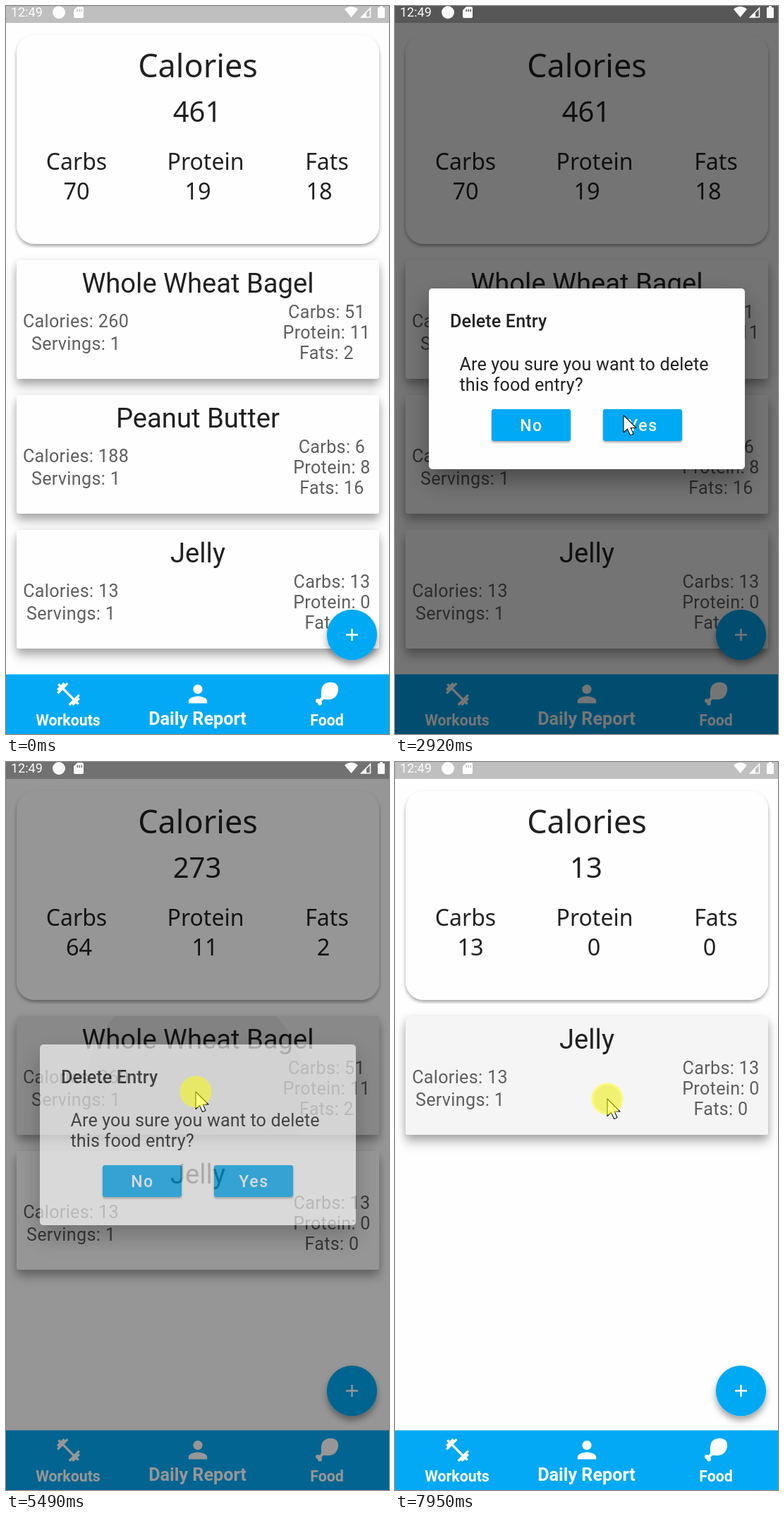
Recreate the animation shown at these times as an HTML page. Size 543 px wide and 1031 px high, loop 8 s.

```html
<!DOCTYPE html>
<html lang="en">
<head>
<meta charset="utf-8">
<title>Daily Report</title>
<style>
  html, body { margin: 0; width: 100%; height: 100%; overflow: hidden; background: #fefefe; }
  svg { display: block; width: 543px; height: 1031px; }
  text { font-family: Roboto, sans-serif; white-space: pre; }
  .mid { text-anchor: middle; }
  .head text { font-family: "Noto Sans", sans-serif; fill: #212121; text-anchor: middle; }
  .title { font-size: 38.2px; fill: #212121; text-anchor: middle; }
  .info { font-size: 25.1px; letter-spacing: .33px; fill: #5f5f5f; text-anchor: middle; }
  .ask { font-size: 25.1px; letter-spacing: .15px; fill: #212121; }
  .btn { font-size: 23px; font-weight: 500; letter-spacing: 1.65px; fill: #fff; text-anchor: middle; }
  .nav text { font-weight: 700; fill: #fff; text-anchor: middle; }
</style>
</head>
<body>
<svg viewBox="0 0 543 1031" xmlns="http://www.w3.org/2000/svg">
  <defs>
    <filter id="lift" x="-10%" y="-20%" width="120%" height="150%">
      <feDropShadow dx="0" dy="3" stdDeviation="6" flood-opacity=".14"/>
      <feDropShadow dx="0" dy="10" stdDeviation="7" flood-opacity=".26"/>
    </filter>
    <filter id="low" x="-10%" y="-10%" width="120%" height="120%">
      <feDropShadow dx="0" dy="3" stdDeviation="2.5" flood-opacity=".36"/>
    </filter>
    <filter id="fabShade" x="-30%" y="-30%" width="160%" height="170%">
      <feDropShadow dx="0" dy="6" stdDeviation="5" flood-opacity=".36"/>
    </filter>
    <filter id="far" x="-20%" y="-20%" width="140%" height="150%">
      <feDropShadow dx="0" dy="16" stdDeviation="16" flood-opacity=".36"/>
    </filter>
    <filter id="btnShade" x="-15%" y="-30%" width="130%" height="180%">
      <feDropShadow dx="0" dy="2" stdDeviation="1.6" flood-opacity=".35"/>
    </filter>
    <filter id="btnUp" x="-20%" y="-40%" width="140%" height="220%">
      <feDropShadow dx="0" dy="6" stdDeviation="5" flood-opacity=".4"/>
    </filter>
    <clipPath id="cardClip"><rect x="15" y="360" width="514" height="168" rx="4"/></clipPath>
    <clipPath id="yesClip"><rect x="295" y="571" width="112" height="45" rx="3"/></clipPath>
  </defs>

  <rect width="543" height="1031" fill="#fefefe"/>
  <g class="head">
    <rect x="15" y="41" width="514" height="296" rx="26" fill="#fefefe" filter="url(#low)"/>
    <rect y="342.5" width="543" height="604" fill="#fefefe"/>
    <text x="272" y="101" font-size="45">Calories</text>
    <text id="cal" x="271" y="164" font-size="40"></text>
    <text x="100" y="232" font-size="32">Carbs</text>
    <text x="283" y="232" font-size="32">Protein</text>
    <text x="455" y="232" font-size="32">Fats</text>
    <g font-size="32.5">
      <text id="carbs" y="273.5"></text>
      <text id="protein" y="273.5"></text>
      <text id="fats" y="273.5"></text>
    </g>
  </g>

  <g id="cards"></g>

  <circle cx="490.5" cy="890.5" r="35.7" fill="#03a9f4" filter="url(#fabShade)"/>
  <path d="M482 890.5h17M490.5 882v17" stroke="#fff" stroke-width="2.4"/>

  <g class="nav">
    <rect y="946.5" width="543" height="84.5" fill="#03a9f4"/>
    <path fill="#fff" transform="translate(68.7 954.7) scale(1.65)" d="M20.57 14.86L22 13.43 20.57 12 17 15.57 8.43 7 12 3.43 10.57 2 9.14 3.43 7.71 2 5.57 4.14 4.14 2.71 2.71 4.14l1.43 1.43L2 7.71l1.43 1.43L2 10.57 3.43 12 7 8.43 15.57 17 12 20.57 13.43 22l1.43-1.43L16.29 22l2.14-2.14 1.43 1.43 1.43-1.43-1.43-1.43L22 16.29z"/>
    <path fill="#fff" transform="translate(252.2 954.4) scale(1.65)" d="M12 12c2.21 0 4-1.79 4-4s-1.79-4-4-4-4 1.79-4 4 1.79 4 4 4zm0 2c-2.67 0-8 1.34-8 4v2h16v-2c0-2.66-5.33-4-8-4z"/>
    <path fill="#fff" d="M449 963C453 957 464 956 469 961C473 966 471 976 465 980C460 983 455 982 450 982L447 979C447 974 446 968 449 963Z"/>
    <path d="M449 980L444 985" stroke="#fff" stroke-width="4.5"/>
    <circle cx="442" cy="984" r="3" fill="#fff"/>
    <circle cx="445" cy="987.5" r="3" fill="#fff"/>
    <text x="88" y="1018.5" font-size="21.3">Workouts</text>
    <text x="271.5" y="1018" font-size="25.2">Daily Report</text>
    <text x="455" y="1018.5" font-size="21.3">Food</text>
  </g>

  <rect id="scrim" width="543" height="1031" fill="#000"/>

  <g id="dialog">
    <rect x="48" y="400" width="448" height="256" rx="5" fill="#fefefe" filter="url(#far)"/>
    <text class="ask" x="78" y="454.5" font-weight="500">Delete Entry</text>
    <text class="ask" x="91.5" y="515.5">Are you sure you want to delete</text>
    <text class="ask" x="91.5" y="545">this food entry?</text>
    <rect x="137" y="571" width="112" height="45" rx="3" fill="#03a9f4" filter="url(#btnShade)"/>
    <rect id="yes" x="295" y="571" width="112" height="45" rx="3" fill="#03a9f4"/>
    <g clip-path="url(#yesClip)">
      <rect id="yesTint" x="295" y="571" width="112" height="45"/>
      <circle id="yesInk" cy="583" opacity=".06"/>
    </g>
    <text class="btn" x="193.5" y="602">No</text>
    <text class="btn" x="351.5" y="602">Yes</text>
  </g>

  <rect width="543" height="24" opacity=".25"/>
  <g fill="#fff" opacity=".96">
    <text x="7" y="15.3" font-size="18">12:49</text>
    <circle cx="75" cy="9" r="9"/>
    <path fill-rule="evenodd" d="M101 1h7q2 0 2 2v12q0 2-2 2h-10q-2 0-2-2V6zM100.500 4.500v3.500h1.500v-3.500zM103.500 4.500v3.500h1.500v-3.500zM106.500 4.500v3.500h1.500v-3.500z"/>
    <path d="M489.500 16L480 4.500Q489.500 -3 499 4.500Z"/>
    <path d="M502 16.500L511 7.500V16.500Z"/>
    <path d="M504 15.700L516.500 3V15.700Z" fill="none" stroke="#fff" stroke-width="1.600"/>
    <path d="M527 3q0-1 1-1h2V0h4v2h2q1 0 1 1v13q0 1-1 1h-8q-1 0-1-1z"/>
  </g>

  <path id="cursor" d="M0 0V24.500L5.500 19.500L9.600 28.500L14 26.500L10.200 18H18Z" fill="#fff" stroke="#111" stroke-width="1.100" stroke-linejoin="round"/>
  <circle id="touch" r="22.5" fill="#ff0" opacity=".5"/>
</svg>

<script>
const LOOP = 8000, PITCH = 191;
const $ = id => document.getElementById(id);
const set = (el, attrs) => { for (const k in attrs) el.setAttribute(k, attrs[k]); };
const show = (el, on) => { el.style.display = on ? '' : 'none'; };
const clamp = v => Math.max(0, Math.min(1, v));

const foods = [
  { name: 'Whole Wheat Bagel', cal: 260, carbs: 51, protein: 11, fats: 2, lx: 99, rx: 454.5, ink: [324, 481] },
  { name: 'Peanut Butter', cal: 188, carbs: 6, protein: 8, fats: 16, lx: 99, rx: 462, ink: [324, 481] },
  { name: 'Jelly', cal: 13, carbs: 13, protein: 0, fats: 0, lx: 92, rx: 462, ink: [301, 477] }
];
foods[0].ink = [269, 467];

// each list: start time, foods shown, x of the three totals
const lists = [
  { at: 0, items: [0, 1, 2], x: [100, 272, 444] },
  { at: 3540, items: [0, 2], x: [103.5, 282, 450] },
  { at: 7030, items: [2], x: [107, 282, 446] }
];
const presses = [[1140, 1], [4920, 0], [7790, 2]];
const dialogs = [
  { open: 1644, tap: 3380, close: 3545, x: 324 },
  { open: 5425, tap: 6800, close: 7008, x: 346 }
];
const touches = [[1140, 2080], [3380, 3460], [4860, 5720], [6800, 6880], [7800, LOOP]];
// start, end, from, to, sideways bow
const moves = [
  [300, 920, [482, 974], [324, 672], 0],
  [2232, 2920, [324, 672], [324, 579.5], 7],
  [4162, 4860, [324, 579.5], [269, 467], 0],
  [5962, 6720, [269, 467], [346, 587], 0],
  [7342, 7725, [346, 587], [301, 477], 0]
];
// bursts of screen updates: first, last, count
const bursts = [
  [0, 0, 1], [300, 920, 9], [1140, 1140, 1], [1310, 1460, 3], [1690, 1850, 3], [2080, 2080, 1],
  [2310, 2920, 9], [3380, 3700, 5], [4240, 4860, 9], [5030, 5260, 4], [5490, 5560, 2],
  [5720, 5720, 1], [6040, 6800, 11], [6880, 7190, 5], [7420, 7800, 6], [7950, 7950, 1]
];
const ticks = bursts.flatMap(([a, b, n]) =>
  Array.from({ length: n }, (_, i) => Math.floor((a + (b - a) * i / Math.max(1, n - 1)) / 10) * 10));

function bezier(x1, y1, x2, y2) {
  const at = (a, b, s) => 3 * a * s * (1 - s) ** 2 + 3 * b * s * s * (1 - s) + s ** 3;
  return x => {
    if (x <= 0 || x >= 1) return clamp(x);
    let lo = 0, hi = 1;
    for (let i = 0; i < 24; i++) {
      const m = (lo + hi) / 2;
      if (at(x1, x2, m) < x) lo = m; else hi = m;
    }
    return at(y1, y2, lo);
  };
}
const ease = bezier(.25, .1, .25, 1), easeOut = bezier(0, 0, .58, 1);

$('cards').innerHTML = foods.map(f => `<g>
  <rect x="15" y="360" width="514" height="168" rx="4" fill="#fefefe" filter="url(#lift)"/>
  <g clip-path="url(#cardClip)">
    <rect x="15" y="360" width="514" height="168" fill="#bcbcbc"/>
    <circle cx="${f.ink[0]}" cy="${f.ink[1]}" fill="#c8c8c8"/>
  </g>
  <text class="title" x="272" y="405.500">${f.name}</text>
  <text class="info" x="${f.lx}" y="454.500">Calories: ${f.cal}</text>
  <text class="info" x="${f.lx}" y="486.500">Servings: 1</text>
  <text class="info" x="${f.rx}" y="441.500">Carbs: ${f.carbs}</text>
  <text class="info" x="${f.rx}" y="471">Protein: ${f.protein}</text>
  <text class="info" x="${f.rx}" y="500">Fats: ${f.fats}</text>
</g>`).join('');
const cards = [...$('cards').children];

function drawList(t) {
  const list = lists.filter(l => t >= l.at).pop();
  const sum = key => list.items.reduce((s, i) => s + foods[i][key], 0);
  $('cal').textContent = sum('cal');
  ['carbs', 'protein', 'fats'].forEach((key, i) => {
    $(key).textContent = sum(key);
    set($(key), { x: list.x[i] });
  });
  cards.forEach((card, i) => {
    const row = list.items.indexOf(i);
    show(card, row >= 0);
    set(card, { transform: `translate(0 ${row * PITCH})` });
  });
}

function drawInk(t) {
  for (const [at, i] of presses) {
    const age = t - at, fade = age < 0 ? 0 : 1 - clamp((age - 560) / 80);
    const [tint, ink] = cards[i].querySelector('g').children;
    set(tint, { opacity: .4 * fade * clamp((age - 100) / 180) });
    set(ink, { opacity: .4 * fade, r: age > 100 ? Math.max(0, 16 + .335 * (age - 150)) : 0 });
  }
}

function drawDialog(t) {
  const d = dialogs.find(d => t >= d.open && t < d.close + 140);
  const v = d ? clamp(Math.min((t - d.open) / 140, 1 - (t - d.close) / 140)) : 0;
  const age = d ? t - d.tap : -1, down = age >= 0;
  set($('scrim'), { opacity: .54 * ease(v) });
  set($('dialog'), { opacity: easeOut(v) });
  show($('dialog'), v > 0);
  set($('yes'), { filter: down ? 'url(#btnUp)' : 'url(#btnShade)' });
  set($('yesTint'), { opacity: down ? .06 + .13 * clamp(age / 150) : 0 });
  set($('yesInk'), { cx: d ? d.x : 0, r: down ? 10 + .2 * age : 0 });
}

function drawCursor(t) {
  const [a, b, p, q, bow] = moves.filter(m => t >= m[0]).pop() || moves[0];
  const u = clamp((t - a) / (b - a)), k = 1 - (1 - u) ** 1.2;
  const x = p[0] + (q[0] - p[0]) * k + bow * Math.sin(Math.PI * u);
  const y = p[1] + (q[1] - p[1]) * k;
  const transform = `translate(${x} ${y})`;
  set($('cursor'), { transform });
  set($('touch'), { transform });
  show($('cursor'), t >= 300);
  show($('touch'), touches.some(([on, off]) => t >= on && t < off));
}

let last = -1;
const start = performance.now();
function frame() {
  const now = (performance.now() - start) % LOOP;
  const t = ticks.filter(k => k <= now).pop() || 0;
  if (t !== last) {
    last = t;
    drawList(t);
    drawInk(t);
    drawDialog(t);
    drawCursor(t);
  }
  requestAnimationFrame(frame);
}
frame();
</script>
</body>
</html>
```
